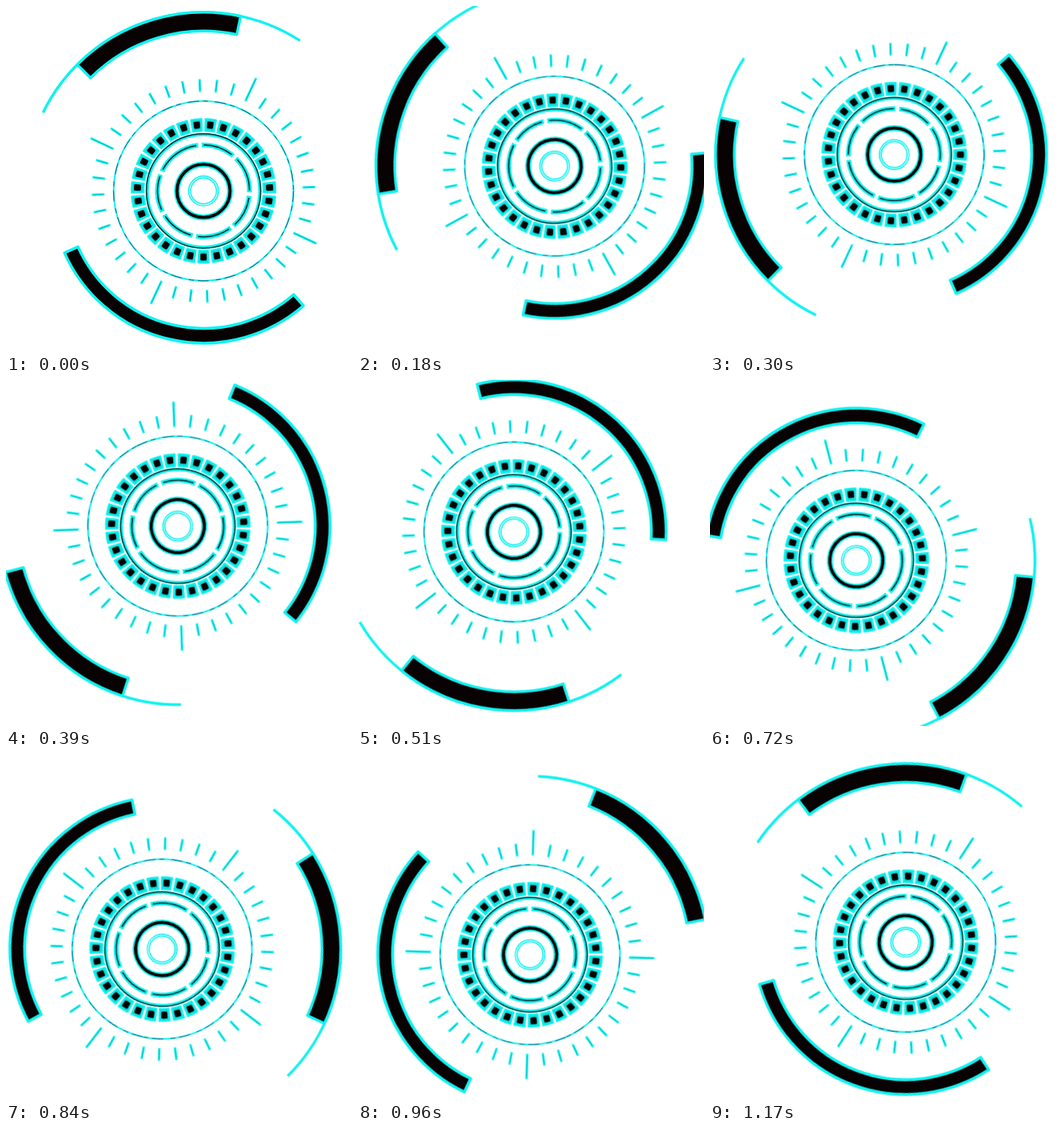
Recreate the animation shown at these times as an HTML page. Size 433 by 433 pixels, loop 1.2 s.

```html
<!DOCTYPE html>
<html lang="en">
<head>
<meta charset="utf-8">
<title>Rotating dial</title>
<style>
  html, body { margin: 0; width: 100%; height: 100%; overflow: hidden; background: #fff; }
  svg { display: block; width: 100%; height: 100%; }
  #dial { transform-origin: 216.2px 217px; }
</style>
</head>
<body>
<svg viewBox="0 0 433 433">
  <g id="dial"><g id="parts" transform="translate(247.2 231.4)" fill="none" stroke-linejoin="round"></g></g>
</svg>
<script>
const CYAN = '#0ff2f0', TEAL = '#0bb9ba', DARK = '#06302f', BLACK = '#080302';
const parts = document.getElementById('parts');

function add(tag, attrs) {
  const el = document.createElementNS('http://www.w3.org/2000/svg', tag);
  for (const key in attrs) el.setAttribute(key, attrs[key]);
  parts.append(el);
}

function at(r, deg) {
  const a = deg * Math.PI / 180;
  return (r * Math.cos(a)).toFixed(2) + ' ' + (r * Math.sin(a)).toFixed(2);
}

const path = (d, stroke, width, more) => add('path', { d, stroke, 'stroke-width': width, ...more });
const ring = (r, stroke, width, more) => add('circle', { r, stroke, 'stroke-width': width, ...more });
const arc = (r, from, to) => `M${at(r, from)}A${r} ${r} 0 0 1 ${at(r, to)}`;
const band = (r1, r2, from, to) =>
  `${arc(r2, from, to)}L${at(r1, to)}A${r1} ${r1} 0 0 0 ${at(r1, from)}Z`;

// Outer bands
path(arc(223.5, -154, -57.3), CYAN, 3.4);
path(band(200, 223.5, -135, -78), CYAN, 3.4, { fill: BLACK });
path(band(172, 190.5, 49, 156), CYAN, 3.6, { fill: BLACK });

// Tick marks, every tenth one long
for (let i = 0; i < 40; i++) {
  const deg = -65 + i * 9, end = i % 10 ? 140 : 156;
  path(`M${at(124, deg)}L${at(end, deg)}`, CYAN, 3);
  path(`M${at(126, deg)}L${at(end - 2, deg)}`, TEAL, 1);
}

ring(112.5, CYAN, 2);
ring(112.5, '#1d4a6c', 0.9, { 'stroke-dasharray': '14 5 6 9' });

// Blocks
const BLOCKS = 31;
for (let i = 0; i < BLOCKS; i++) {
  const deg = 90 + i * 360 / BLOCKS;
  path(band(75, 90, deg - 4.2, deg + 4.2), CYAN, 2.2, { fill: '#0cd8d6' });
  path(band(80, 85.5, deg - 1.6, deg + 1.6), BLACK, 3.2, { fill: BLACK });
}

ring(70.5, CYAN, 4);
ring(71.5, DARK, 1.5);

// Broken ring
const gaps = [-157, -94.5, -47.5, 4, 51.5, 101.5, 151, 203];
for (let i = 0; i < gaps.length - 1; i++) {
  const from = gaps[i] + 2.2, to = gaps[i + 1] - 2.2;
  path(arc(57.5, from, to), CYAN, 6);
  path(arc(57.5, from + 2.5, to - 2.5), DARK, 1.6);
}

// Hub
ring(33.2, CYAN, 7.4);
ring(33.2, BLACK, 3.8);
ring(17.4, CYAN, 4);
ring(17.4, '#c4fbfa', 1.2);

// Half a turn at even speed, then half a turn that slows down slightly
const STEPS = 40, frames = [];
for (let i = 0; i <= STEPS; i++) {
  const half = i / STEPS * 2, x = Math.max(0, half - 1);
  const turn = 180 * (half + 0.125 * x * (1 - x));
  frames.push({ transform: `rotate(${-turn}deg)`, easing: 'step-end' });
}
document.getElementById('dial').animate(frames, { duration: 1200, iterations: Infinity });
</script>
</body>
</html>
```
